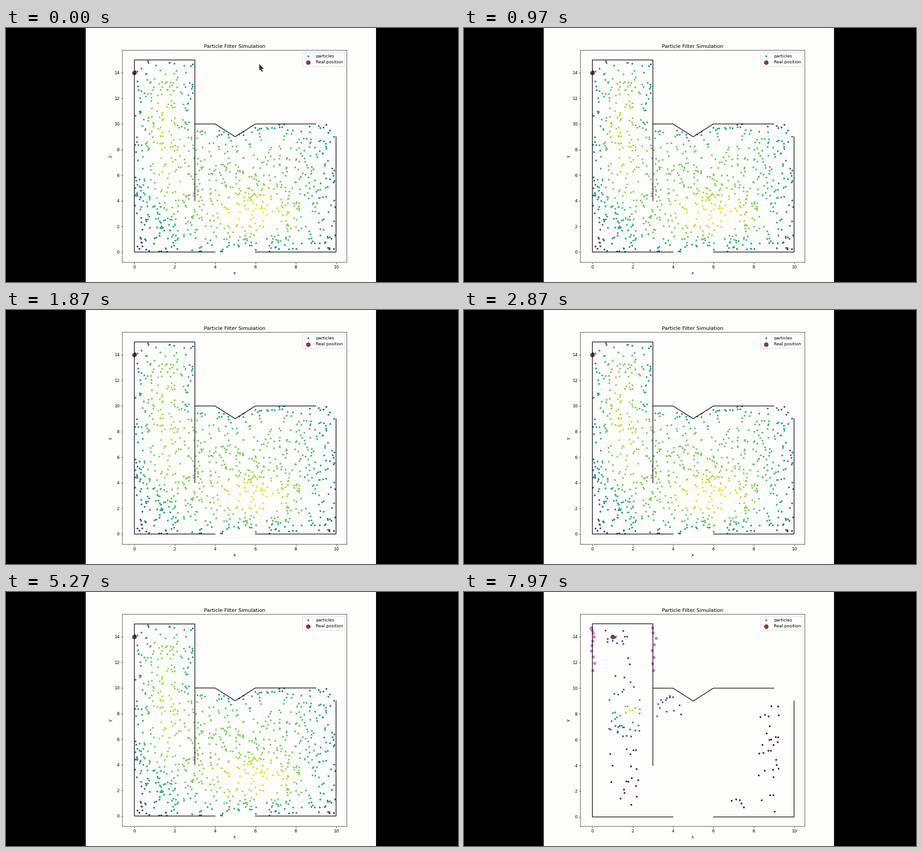
Animation, 998 px wide and 561 px high, one loop 8000 ms. Source, as a matplotlib script:

```python
import numpy as np
import matplotlib.pyplot as plt
from matplotlib.animation import FuncAnimation
from matplotlib.markers import MarkerStyle
from matplotlib.patches import Polygon, Rectangle

W, H, DPI = 998, 561, 64
PX = 72 / DPI             # points per stage pixel
PT = 0.932 * PX           # size of one chart point on the stage
INTERVAL, FRAMES = 50, 160
CURSOR_OFF, UPDATE_AT = 400, 6700   # ms
PAPER = "#fdfdfb"

plt.rcParams.update({
    "font.family": "DejaVu Sans",
    "font.size": 10 * PT,
    "axes.linewidth": 0.8 * PT,
    "axes.titlepad": 6 * PT,
    "axes.labelpad": 4 * PT,
    "patch.linewidth": 1.0 * PT,
})
for axis in "xy":
    plt.rcParams.update({f"{axis}tick.major.size": 3.5 * PT,
                         f"{axis}tick.major.width": 0.8 * PT,
                         f"{axis}tick.major.pad": 3.5 * PT})

WALLS = [
    [(4, 0), (0, 0), (0, 15), (3, 15), (3, 4)],
    [(3, 10), (4, 10), (5, 9), (6, 10), (9, 10)],
    [(10, 9), (10, 0), (6, 0)],
]
BEST_GUESS = (1.86, 8.28)


def bump(x, y, cx, cy, sx, sy):
    return np.exp(-((x - cx) / sx) ** 2 - ((y - cy) / sy) ** 2)


def uniform_particles(count=880):
    """Even spread over the room, weighted by distance to the walls."""
    rng = np.random.default_rng(7)
    x, y = rng.uniform(0, 10, 4000), rng.uniform(0, 15, 4000)
    top = np.where(x < 3, 15, 10)
    notch = np.where(x < 3, 0, np.maximum(0, 1 - abs(x - 5)))
    inside = np.flatnonzero(y < top - notch)[:count]
    x, y, top = x[inside], y[inside], top[inside]

    corridor = (x < 3) & (y > 4)
    weight = 0.78 - 0.42 * np.exp(-x / 0.4) - 0.4 * np.exp(-y / 0.7)
    weight -= 0.42 * np.exp(-(10 - x) / 0.8)
    weight -= 0.42 * np.exp(-(top - y) / 0.45)
    weight -= np.where(corridor & (y > 9), 0.3 * np.exp(-(3 - x) / 0.4), 0)
    weight += np.where(corridor, 0.13 * bump(x, y, 1.5, 8.5, 0.8, 5), 0)
    weight += 0.22 * bump(x, y, 6, 2.9, 2.0, 1.7)
    weight -= 0.25 * bump(x, y, 0.6, 1.6, 1.2, 1.6)
    weight -= 0.2 * bump(x, y, 5, 9.2, 0.8, 0.7)
    return np.column_stack([x, y]), np.clip(weight, 0.03, 0.97)


def resampled_particles():
    """Survivors along the corridor, at its exit and by the far wall."""
    rng = np.random.default_rng(3)

    def cloud(n, cx, cy, half_w, half_h):
        return rng.uniform((cx - half_w, cy - half_h),
                           (cx + half_w, cy + half_h), (n, 2))

    points = np.vstack([
        cloud(13, 1.25, 13.9, 0.6, 0.6),
        cloud(40, 1.6, 6.5, 0.8, 6.2),
        cloud(22, 1.55, 7.4, 0.9, 1.4),
        cloud(14, 3.8, 8.6, 0.6, 0.9),
        cloud(30, 8.8, 4.6, 0.55, 4.3),
        cloud(5, 7.2, 1.1, 0.4, 0.6),
        [BEST_GUESS],
    ])
    x, y = points.T
    best = np.exp(-np.hypot(x - BEST_GUESS[0], y - BEST_GUESS[1]) / 1.5)
    second = 0.28 * bump(x, y, 1.1, 13.9, 1.1, 1.1)
    return points, np.clip(np.maximum(best, second), 0.04, 0.96)


def wall_hits():
    """Measured points on both corridor walls, denser near the robot."""
    rng = np.random.default_rng(5)
    sides = []
    for x, n, power in ((0, 11, 1.7), (3.05, 8, 1.1)):
        y = 14.7 - 3.3 * np.linspace(0, 1, n) ** power
        sides.append(np.column_stack([rng.normal(x, 0.06, n), y]))
    return np.vstack(sides)


fig = plt.figure(figsize=(W / DPI, H / DPI), dpi=DPI, facecolor="black")

page = fig.add_axes([0, 0, 1, 1], zorder=0)
overlay = fig.add_axes([0, 0, 1, 1], zorder=2)
for layer in (page, overlay):
    layer.set(xlim=(0, W), ylim=(H, 0))
    layer.axis("off")
page.add_patch(Rectangle((176, 0), 641, H, fc=PAPER, ec="none"))
cursor = overlay.add_patch(Polygon(
    [(559, 79), (559, 94.5), (562.3, 91.8), (565, 97.2), (567.5, 96),
     (565, 90.6), (569.5, 90.2)], fc="#2e2e26", ec="#c8c8c0", lw=0.7 * PX))

left, right, top, bottom = 257, 752.7, 49.2, 517.8
ax = fig.add_axes([left / W, 1 - bottom / H, (right - left) / W,
                   (bottom - top) / H], zorder=1, facecolor=PAPER)
ax.set(xlim=(-0.595, 10.54), title="Particle Filter Simulation",
       xlabel="x", ylabel="y", xticks=range(0, 11, 2), yticks=range(0, 15, 2))
for spine in ax.spines.values():
    spine.set_snap(False)

for wall in WALLS:
    ax.plot(*zip(*wall), color="black", lw=1.5 * PT, zorder=2,
            solid_capstyle="projecting", snap=False)

DOT = (4 * PX) ** 2
ROBOT = dict(s=(9 * PX) ** 2, c="tab:red", edgecolors="black", lw=0.95 * PT)


def draw_particles(points, weights):
    return ax.scatter(*points.T, s=DOT, c=weights, cmap="viridis",
                      vmin=0, vmax=1, lw=0, zorder=1)


def draw_robot(x, y, marker, dx, dy):
    body = ax.scatter([x], [y], marker=marker, zorder=1.5, **ROBOT)
    heading, = ax.plot([x, x + dx], [y, y + dy], color="black",
                       lw=0.9 * PT, zorder=2)
    return [body, heading]


before = [draw_particles(*uniform_particles())]
before += draw_robot(0, 14, "h", 0.1, 0)
after = [draw_particles(*resampled_particles()),
         ax.scatter(*wall_hits().T, s=(7 * PX) ** 2, c="tab:pink", lw=0,
                    zorder=1)]
after += draw_robot(1, 14, "H", 0, 0.1)

ax.scatter([], [], s=DOT, c="tab:blue", lw=0, label="particles")
ax.scatter([], [], marker="h", label="Real position", **ROBOT)
legend = ax.legend(loc="upper right")
legend_robot = legend.legend_handles[1]


def marker_path(name):
    style = MarkerStyle(name)
    return style.get_path().transformed(style.get_transform())


HEXAGONS = marker_path("h"), marker_path("H")


def update(frame):
    now = frame * INTERVAL
    updated = now >= UPDATE_AT
    cursor.set_visible(now < CURSOR_OFF)
    for artist in before:
        artist.set_visible(not updated)
    for artist in after:
        artist.set_visible(updated)
    legend_robot.set_paths([HEXAGONS[int(updated)]])
    ax.set_ylim((-0.74, 15.74) if updated else (-0.815, 15.755))
    return []


anim = FuncAnimation(fig, update, frames=FRAMES, init_func=lambda: update(0),
                     interval=INTERVAL, repeat=True, repeat_delay=0, blit=False)
plt.show()
```
